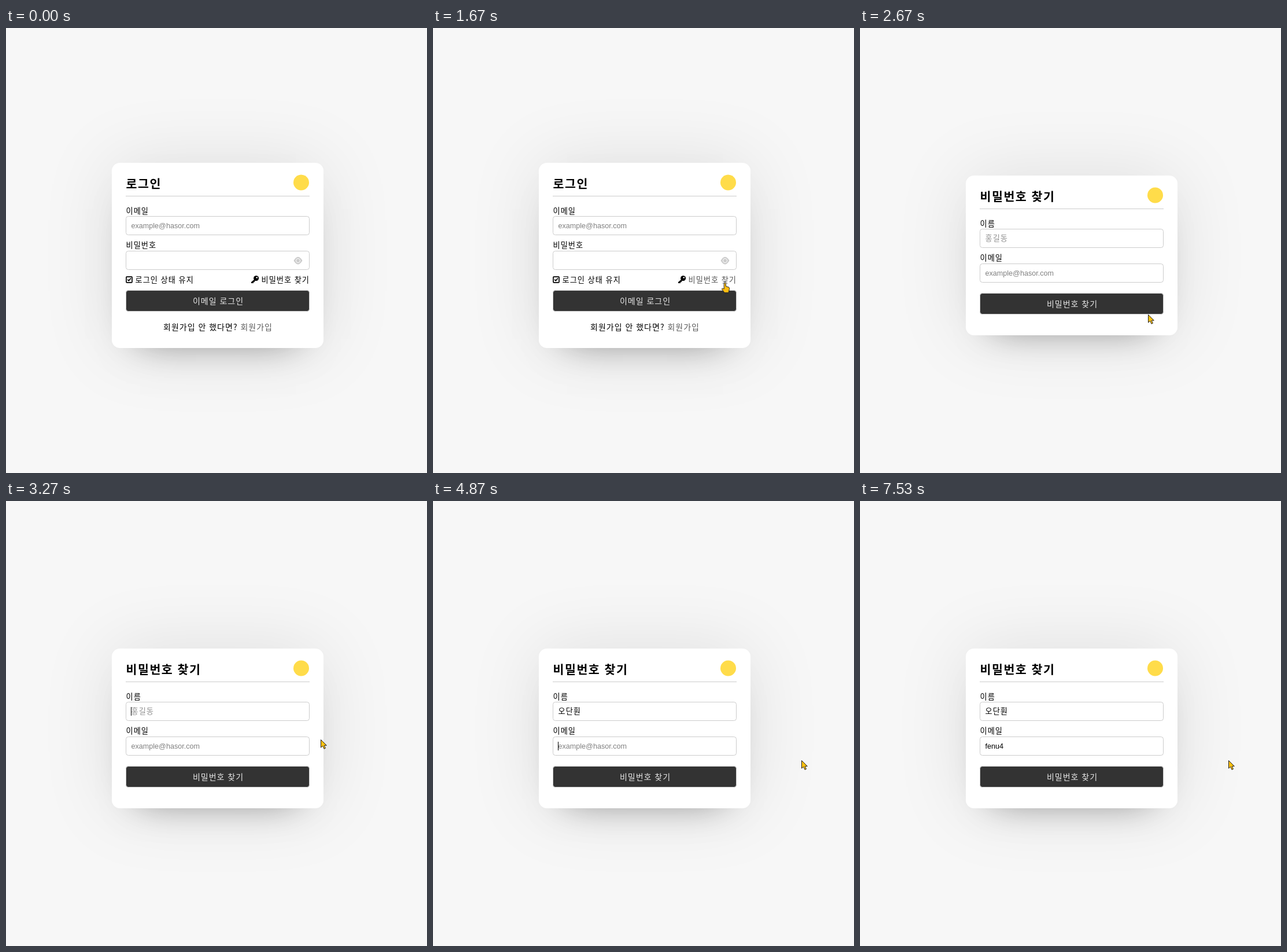
Recreate the animation shown at these times as an HTML page. Size 728 px wide and 769 px high, loop 8000 ms.

```html
<!DOCTYPE html>
<html lang="ko">
<head>
<meta charset="utf-8">
<style>
html, body { margin: 0; width: 100%; height: 100%; overflow: hidden; background: #f7f7f7; }
#card {
  position: absolute; left: 183px; width: 366px; border-radius: 14px; background: #fff;
  box-shadow: 0 0 128px rgba(0,0,0,.1), 0 32px 64px -48px rgba(0,0,0,.5);
}
svg { position: absolute; left: 0; top: 0; }
text { font: 13.2px "Noto Sans CJK KR", "Noto Sans CJK", sans-serif; letter-spacing: 1px; white-space: pre; }
.title { font-size: 20.6px; font-weight: 700; letter-spacing: 1.5px; }
.big { font-size: 14px; }
.thin { font-weight: 300; opacity: .88; }
.mail { font: 12.6px "Liberation Sans", Arial, sans-serif; letter-spacing: 0; }
.hint { fill: #808080; }
.field { fill: #fff; stroke: #ccc; }
.button { fill: #333; stroke: #ccc; }
</style>
</head>
<body>
<div id="card"></div>
<svg width="728" height="769">
  <g id="login"></g>
  <g id="find"></g>
  <rect id="caret" width="1" height="15"/>
  <g id="cursor" stroke="#222" stroke-linejoin="round">
    <path id="arrow" fill="#ffc20e" d="M.5 .5V14L3.7 11.2 6 16.3 8.4 15.2 6.2 10.3H10.3Z"/>
    <path id="hand" fill="#ffbd10" d="M-1.8 1.8Q-.2 -.4 1.4 1.8V6.4L6.4 7.8Q7.9 8.6 7.4 11.6L6 17.3H-1L-5.6 11.2Q-5.2 9 -1.8 11Z"/>
    <path id="beam" fill="none" d="M-3 -8H3M0 -8V8M-3 8H3"/>
  </g>
</svg>
<script>
const $ = id => document.getElementById(id);
const label = (x, y, s, cls = '', extra = '') => `<text x="${x}" y="${y}" class="${cls}" ${extra}>${s}</text>`;
const box = (cls, y, h) => `<rect class="${cls}" x="207.5" y="${y}.5" width="317" height="${h}" rx="4"/>`;
const field = y => box('field', y, 32);
const header = (y, s) => label(207.5, y + 43.5, s, 'title') +
  `<circle cx="510.5" cy="${y + 34}" r="13.5" fill="#ffdc4a"/>
   <path d="M207 ${y + 57.5}H525" stroke="#ccc"/>`;
const button = (y, s) => box('button', y, 36) +
  label(367, y + 23.5, s, 'big thin', 'fill="#fff" text-anchor="middle"');
const mailHint = 'example@hasor.com';

$('login').innerHTML = header(233, '로그인') +
  label(207.5, 320.5, '이메일') + field(325) + label(216.5, 346, mailHint, 'mail hint') +
  label(207.5, 380, '비밀번호') + field(385) +
  `<path d="M497.5 402Q505 389 512.5 402Q505 415 497.5 402Z" fill="#ccc"/>
   <circle cx="505" cy="402" r="3.6" fill="none" stroke="#fff"/>
   <rect x="208" y="429.8" width="10" height="10" rx="1" fill="none" stroke="#000" stroke-width="1.7"/>
   <path d="M210.3 434.6L212.3 436.8 215.9 432.4" fill="none" stroke="#000" stroke-width="1.7"/>
   <path d="M430 434L424 439V441H428V439H430V437L433 436Z"/>
   <circle cx="432.6" cy="432.5" r="4.5"/><circle cx="433.8" cy="431.3" r="1.2" fill="#fff"/>` +
  label(223.5, 439.5, '로그인 상태 유지') +
  label(441.5, 439.5, '비밀번호 찾기', '', 'id="link"') +
  button(453, '이메일 로그인') +
  label(366.5, 521.5, '회원가입 안 했다면? <tspan class="thin" fill="#444">회원가입</tspan>', 'big', 'text-anchor="middle"');

$('find').innerHTML = header(255, '비밀번호 찾기') +
  label(207.5, 342.5, '이름') + field(347) + label(216.5, 368, '', '', 'id="name"') +
  label(207.5, 402, '이메일') + field(407) + label(216.5, 427.5, '', 'mail', 'id="mail"') +
  '<path id="compose" stroke="#000"/>' +
  button(458, '비밀번호 찾기');

// All times below are in ticks of 1/15 s.
const path = [[10, 685, 583], [14, 540, 649], [15, 540, 649], [18, 537, 521], [25, 505, 440],
  [32, 505, 440], [40, 498, 495], [43, 460, 460], [45, 420, 365], [52, 637, 448], [120, 637, 448]];
const syllables = ['ㅇ', '오', '옫', '오다', '오단', '오단ㅎ', '오단후', '오단훠', '오단훤'];
const nameKeys = [60, 62, 63, 65, 66, 67, 68, 70, 71];
const mailKeys = [91, 92, 94, 100, 105];
const pressed = (keys, n) => keys.filter(k => k <= n).length;
const show = (el, on) => el.style.display = on ? '' : 'none';

function pointer(n) {
  const i = Math.max(1, path.findIndex(p => p[0] > n));
  const [a, x0, y0] = path[i - 1], [b, x1, y1] = path[i];
  const k = (n - a) / (b - a);
  return [Math.round(x0 + (x1 - x0) * k), Math.round(y0 + (y1 - y0) * k)];
}

function drawPointer(n, finding) {
  show($('cursor'), n >= 10);
  const [x, y] = pointer(Math.max(n, 10));
  const inside = (l, t, r, b) => x >= l && x < r && y >= t && y < b;
  const onLink = !finding && inside(424, 427, 525, 444);
  const onButton = finding ? inside(207, 458, 525, 495) : inside(207, 453, 525, 490);
  const onField = finding && (inside(207, 347, 525, 380) || inside(207, 407, 525, 440));
  const hand = onLink || onButton || (finding && n < 33);
  show($('hand'), hand);
  show($('beam'), onField && !hand);
  show($('arrow'), !hand && !onField);
  $('cursor').setAttribute('transform', `translate(${x} ${y})`);
  $('link').setAttribute('fill', onLink ? '#555' : '#000');
}

function drawFields(n) {
  const name = syllables[pressed(nameKeys, n) - 1] || '';
  const mail = 'fenu4'.slice(0, pressed(mailKeys, n));
  $('name').textContent = name || '홍길동';
  $('name').setAttribute('class', name ? '' : 'hint thin');
  $('mail').textContent = mail || mailHint;
  $('mail').setAttribute('class', mail ? 'mail' : 'mail hint');

  const nameEnd = name ? 217 + 13.15 * name.length : 216;
  const mailEnd = mail ? 213 + 7 * mail.length : 216;
  const inMail = n >= 73;
  show($('caret'), (n >= 45 && n < 53) || (n >= 60 && n < 81) || (n >= 89 && n < 113));
  $('caret').setAttribute('x', Math.floor(inMail ? mailEnd : nameEnd));
  $('caret').setAttribute('y', inMail ? 416 : 356);
  show($('compose'), name && !inMail);
  $('compose').setAttribute('d', `M${nameEnd - 13} 370.5H${nameEnd - 1}`);
}

const start = performance.now();
function frame() {
  const time = (performance.now() - start) % 8000;
  const n = Math.floor((time + 5) * 15 / 1000) % 120;
  const finding = n >= 31;
  $('card').style.top = (finding ? 255 : 233) + 'px';
  $('card').style.height = (finding ? 276 : 320) + 'px';
  show($('login'), !finding);
  show($('find'), finding);
  drawFields(n);
  drawPointer(n, finding);
  requestAnimationFrame(frame);
}
frame();
</script>
</body>
</html>
```
